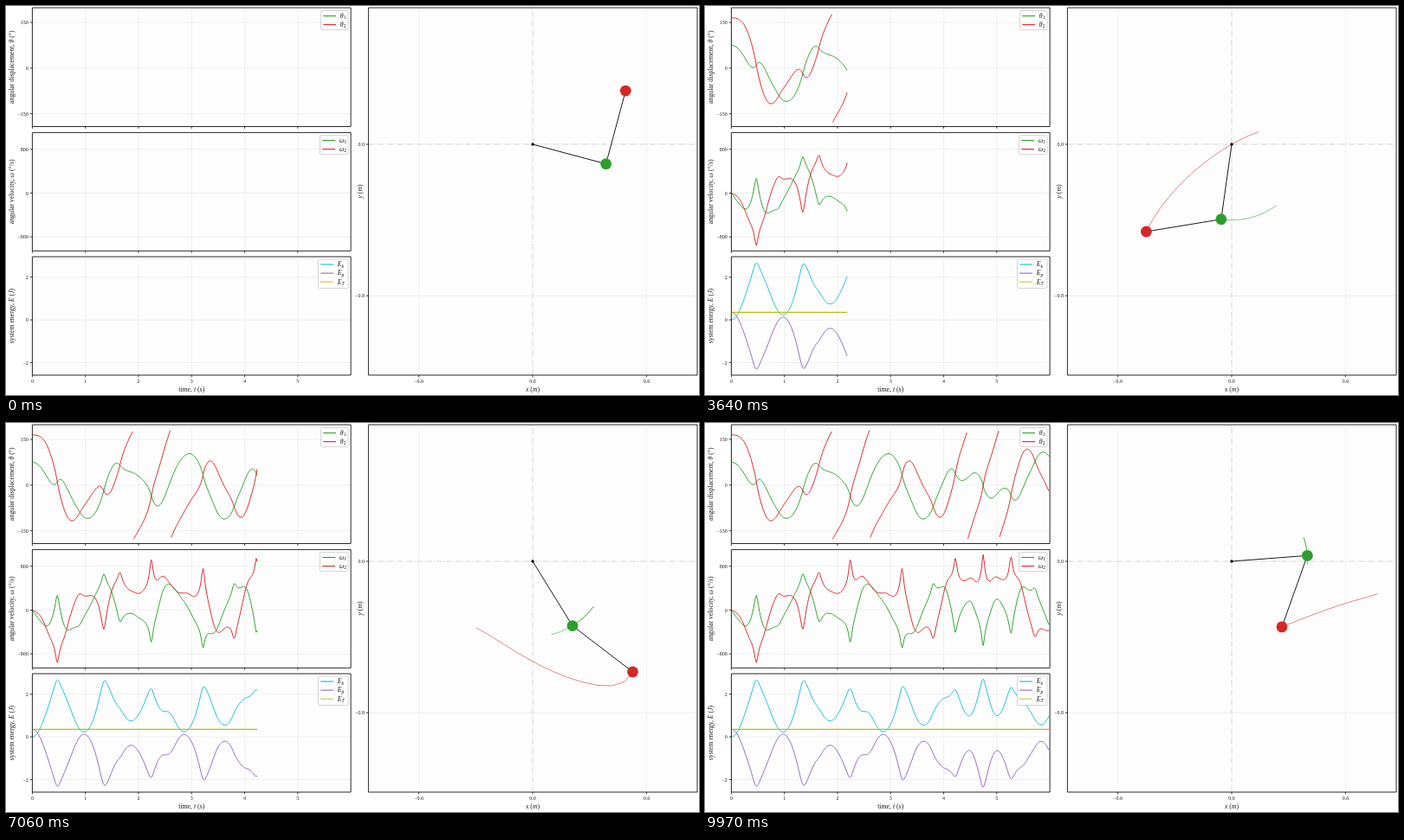
An HTML page with a canvas that plays this animation: 800 by 450 pixels, repeating every 10000 ms.

```html
<!DOCTYPE html>
<html lang="en">
<head>
<meta charset="utf-8">
<title>Double pendulum</title>
<style>
  html, body { margin: 0; width: 100%; height: 100%; overflow: hidden; background: #fff; }
  canvas { display: block; width: 800px; height: 450px; }
</style>
</head>
<body>
<canvas id="stage"></canvas>
<script>
const canvas = document.getElementById('stage');
const ctx = canvas.getContext('2d');
const ratio = window.devicePixelRatio || 1;
canvas.width = 800 * ratio;
canvas.height = 450 * ratio;
ctx.scale(ratio, ratio);

const GREEN = '#2ca02c', RED = '#d62728', CYAN = '#17becf', PURPLE = '#9467bd', OLIVE = '#bcbd22';
const FONT = '"Liberation Serif", "Noto Serif", serif';
const LOOP = 10000, FPS = 33, FRAMES = 330, DT = 6 / FRAMES, TRAIL = 13;
const MASS = 0.2, LENGTH = 0.4, G = 9.81, DEG = 180 / Math.PI;
const PIVOT = { x: 608, y: 160 }, METRE = 219;

// Equal masses and equal rods; state is [angle1, angle2, speed1, speed2].
function derivative([a, b, u, v]) {
  const s = Math.sin(b - a), c = Math.cos(b - a), k = G / LENGTH;
  const p = k * Math.sin(a), q = k * Math.sin(b), den = 2 - c * c;
  return [u, v,
    (u * u * s * c + q * c + v * v * s - 2 * p) / den,
    (2 * (p * c - u * u * s - q) - v * v * s * c) / den];
}

function rk4(y, h) {
  const add = (k, f) => y.map((value, i) => value + f * k[i]);
  const k1 = derivative(y);
  const k2 = derivative(add(k1, h / 2));
  const k3 = derivative(add(k2, h / 2));
  const k4 = derivative(add(k3, h));
  return y.map((value, i) => value + h / 6 * (k1[i] + 2 * k2[i] + 2 * k3[i] + k4[i]));
}

const wrap = deg => deg - 360 * Math.round(deg / 360);

function sample([a, b, u, v]) {
  const kinetic = MASS * LENGTH ** 2 / 2 * (2 * u * u + v * v + 2 * u * v * Math.cos(a - b));
  const potential = -MASS * G * LENGTH * (2 * Math.cos(a) + Math.cos(b));
  const reach = LENGTH * METRE;
  const bob1 = { x: PIVOT.x + reach * Math.sin(a), y: PIVOT.y + reach * Math.cos(a) };
  const bob2 = { x: bob1.x + reach * Math.sin(b), y: bob1.y + reach * Math.cos(b) };
  return { theta1: wrap(a * DEG), theta2: wrap(b * DEG), omega1: u * DEG, omega2: v * DEG,
    kinetic, potential, total: kinetic + potential, bob1, bob2 };
}

function simulate() {
  const substeps = 60, samples = [];
  let state = [75 / DEG, 165 / DEG, 0, 0];
  for (let n = 0; n < FRAMES; n++) {
    samples.push(sample(state));
    for (let i = 0; i < substeps; i++) state = rk4(state, DT / substeps);
  }
  return samples;
}
const samples = simulate();

const timeX = t => 30.4 + 61.28 * t;

const panels = [
  { top: 2, bottom: 139.5, zero: 71.8, unit: 0.352, tick: 150, title: 'angular displacement, *θ* (°)',
    legend: { x: 363.5, y: 5.5, h: 22 },
    curves: [['theta1', GREEN, '*θ*_1'], ['theta2', RED, '*θ*_2']] },
  { top: 146.4, bottom: 283.3, zero: 216.4, unit: 0.0634, tick: 800, title: 'angular velocity, *ω* (°/*s*)',
    legend: { x: 362.5, y: 149.5, h: 22 },
    curves: [['omega1', GREEN, '*ω*_1'], ['omega2', RED, '*ω*_2']] },
  { top: 290, bottom: 427, zero: 363.1, unit: 24.7, tick: 2, title: 'system energy, *E* (*J*)',
    legend: { x: 360.5, y: 293, h: 33.5 },
    curves: [['kinetic', CYAN, '*E*_k'], ['potential', PURPLE, '*E*_p'], ['total', OLIVE, '*E*_T']] }
];

function line(points, color, width) {
  ctx.beginPath();
  points.forEach(([x, y], i) => i ? ctx.lineTo(x, y) : ctx.moveTo(x, y));
  ctx.strokeStyle = color;
  ctx.lineWidth = width;
  ctx.stroke();
}

function disc({ x, y }, radius, color) {
  ctx.beginPath();
  ctx.arc(x, y, radius, 0, 2 * Math.PI);
  ctx.fillStyle = color;
  ctx.fill();
}

function label(text, x, y, align, size = 6) {
  ctx.font = `${size}px ${FONT}`;
  ctx.textAlign = align;
  ctx.textBaseline = 'alphabetic';
  ctx.fillStyle = '#1a1a1a';
  ctx.fillText(text, x, y);
}

// Markup: *italic*, and _x for a subscript at the end.
function rich(markup, x, y, size, centred) {
  const [main, sub] = markup.split('_');
  const runs = main.split('*').map((text, i) => ({ text, size, dy: 0, italic: i % 2 === 1 }));
  if (sub) runs.push({ text: sub, size: size * 0.72, dy: 1.3, italic: /[a-z]/i.test(sub) });
  const setFont = run => { ctx.font = `${run.italic ? 'italic ' : ''}${run.size}px ${FONT}`; };
  let width = 0;
  for (const run of runs) {
    setFont(run);
    run.width = ctx.measureText(run.text).width;
    width += run.width;
  }
  if (centred) x -= width / 2;
  ctx.textAlign = 'left';
  ctx.textBaseline = 'alphabetic';
  ctx.fillStyle = '#1a1a1a';
  for (const run of runs) {
    setFont(run);
    ctx.fillText(run.text, x, y + run.dy);
    x += run.width;
  }
}

function sideTitle(markup, x, y) {
  ctx.save();
  ctx.translate(x, y);
  ctx.rotate(-Math.PI / 2);
  rich(markup, 0, 0, 7.8, true);
  ctx.restore();
}

function frameBox(x, y, right, bottom) {
  ctx.strokeStyle = '#111';
  ctx.lineWidth = 0.9;
  ctx.strokeRect(x, y, right - x, bottom - y);
}

function clipTo(x, y, right, bottom) {
  ctx.save();
  ctx.beginPath();
  ctx.rect(x, y, right - x, bottom - y);
  ctx.clip();
}

const signed = text => text.replace('-', '−');

function drawCurve(panel, key, color, last) {
  ctx.beginPath();
  let previous = Infinity;
  for (let n = 0; n <= last; n++) {
    const value = samples[n][key];
    const x = timeX(n * DT), y = panel.zero - value * panel.unit;
    const broken = key.startsWith('theta') && Math.abs(value - previous) > 180;
    if (n === 0 || broken) ctx.moveTo(x, y); else ctx.lineTo(x, y);
    previous = value;
  }
  ctx.strokeStyle = color;
  ctx.lineWidth = key === 'total' ? 1.2 : 0.95;
  ctx.stroke();
}

function drawLegend({ legend, curves }) {
  ctx.beginPath();
  ctx.roundRect(legend.x, legend.y, 395 - legend.x, legend.h, 1.6);
  ctx.fillStyle = 'rgba(255,255,255,0.8)';
  ctx.fill();
  ctx.strokeStyle = '#ccc';
  ctx.lineWidth = 0.8;
  ctx.stroke();
  curves.forEach(([key, color, name], i) => {
    const x = legend.x + 2.7, y = legend.y + 6 + i * 10.1;
    const stroke = [[x, y], [x + 14.8, y]];
    if (key === 'total') {
      line(stroke, '#e4e49a', 1);
      ctx.setLineDash([2, 0.9]);
    }
    line(stroke, color, 1.1);
    ctx.setLineDash([]);
    rich(name, x + 19.6, y + 2.3, 7.8);
  });
}

function drawPanel(panel, last) {
  const { top, bottom, zero, unit, tick } = panel;
  const left = timeX(0), right = 398.1;
  ctx.fillStyle = '#fdfdfd';
  ctx.fillRect(left, top, right - left, bottom - top);
  for (let t = 0; t < 6; t++) {
    if (t) line([[timeX(t), top], [timeX(t), bottom]], '#ececec', 0.8);
    line([[timeX(t), bottom], [timeX(t), bottom + 2.4]], '#111', 0.8);
  }
  for (const value of [tick, 0, -tick]) {
    const y = zero - value * unit;
    line([[left, y], [right, y]], '#ececec', 0.8);
    line([[left - 2.6, y], [left, y]], '#111', 0.8);
    label(signed(String(value)), left - 4.6, y + 2.1, 'right');
  }
  clipTo(left, top, right, bottom);
  for (const [key, color] of panel.curves) drawCurve(panel, key, color, last);
  ctx.restore();
  frameBox(left, top, right, bottom);
  drawLegend(panel);
  sideTitle(panel.title, 8.6, (top + bottom) / 2);
}

function drawTrail(key, color, last) {
  const points = samples.slice(Math.max(0, last - TRAIL), last + 1).map(s => [s[key].x, s[key].y]);
  ctx.globalAlpha = 0.7;
  line(points, color, 0.8);
  ctx.globalAlpha = 1;
}

function drawPendulum(last) {
  const left = 418.4, right = 798, top = 2, bottom = 427;
  ctx.fillStyle = '#fdfdfd';
  ctx.fillRect(left, top, right - left, bottom - top);
  for (const value of [-0.6, 0, 0.6]) {
    const x = PIVOT.x + value * METRE;
    if (value) line([[x, top], [x, bottom]], '#ececec', 0.8);
    line([[x, bottom], [x, bottom + 2.4]], '#111', 0.8);
    label(signed(value.toFixed(1)), x, 436.3, 'center');
  }
  for (const value of [0, -0.8]) {
    const y = PIVOT.y - value * METRE;
    if (value) line([[left, y], [right, y]], '#ececec', 0.8);
    line([[left - 2.6, y], [left, y]], '#111', 0.8);
    label(signed(value.toFixed(1)), left - 4.4, y + 2.1, 'right');
  }
  ctx.setLineDash([6.4, 1.8, 1.2, 1.8]);
  line([[left, PIVOT.y], [right, PIVOT.y]], '#d3d3d3', 0.9);
  line([[PIVOT.x, bottom], [PIVOT.x, top]], '#d3d3d3', 0.9);
  ctx.setLineDash([]);

  const { bob1, bob2 } = samples[last];
  clipTo(left, top, right, bottom);
  drawTrail('bob1', GREEN, last);
  drawTrail('bob2', RED, last);
  line([PIVOT, bob1, bob2].map(p => [p.x, p.y]), '#111', 0.95);
  disc(PIVOT, 1.7, '#000');
  disc(bob1, 6.4, GREEN);
  disc(bob2, 6.4, RED);
  ctx.restore();

  frameBox(left, top, right, bottom);
  rich('*x* (*m*)', PIVOT.x, 445.6, 7.8, true);
  sideTitle('*y* (*m*)', 411.2, 214.5);
}

function draw(now) {
  const last = Math.min(FRAMES - 1, Math.floor((now % LOOP + 5) * FPS / 1000));
  ctx.fillStyle = '#fff';
  ctx.fillRect(0, 0, 800, 450);
  ctx.lineJoin = 'round';
  for (const panel of panels) drawPanel(panel, last);
  for (let t = 0; t < 6; t++) label(String(t), timeX(t), 436.3, 'center');
  rich('time, *t* (*s*)', 214.2, 445.6, 7.8, true);
  drawPendulum(last);
}

function tick(now) {
  draw(now);
  requestAnimationFrame(tick);
}
draw(0);
requestAnimationFrame(tick);
</script>
</body>
</html>
```
